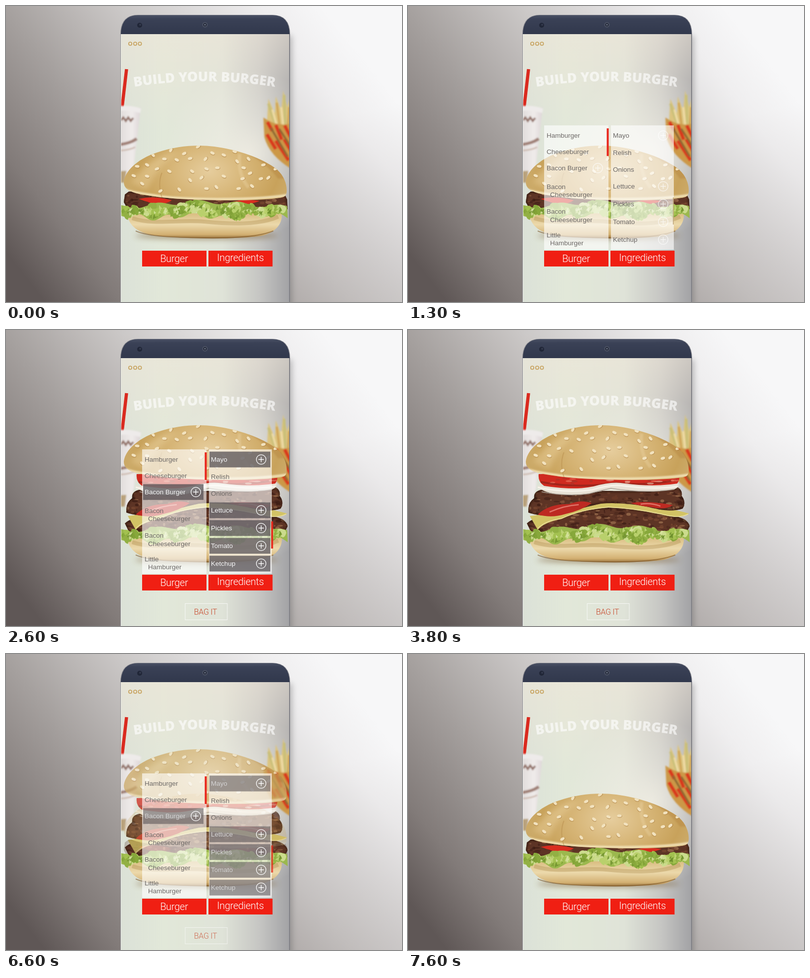
Write an HTML page that moves like this. It is 800 by 600 pixels and loops after 7.7 s.

```html
<!DOCTYPE html>
<html lang="en">
<head>
<meta charset="utf-8">
<title>Build your burger</title>
<style>
html, body { margin: 0; width: 100%; height: 100%; overflow: hidden; }
svg { display: block; width: 100vw; height: 100vh; }
.menu { font: 13.5px "Liberation Sans", Arial, sans-serif; }
.thin { font: 300 20px Roboto, "Liberation Sans", sans-serif; letter-spacing: -.3px; text-anchor: middle; }
#title { font: 800 30px "Open Sans", Roboto, sans-serif; font-stretch: 75%; text-anchor: middle; }
</style>
</head>
<body>
<svg viewBox="0 0 800 600">
<defs>
  <linearGradient id="wall" gradientUnits="userSpaceOnUse" x1="0" y1="500" x2="640" y2="0">
    <stop offset="0" stop-color="#5f5756"/><stop offset=".15" stop-color="#827b79"/>
    <stop offset=".37" stop-color="#a5a09e"/><stop offset=".6" stop-color="#cbc8c7"/>
    <stop offset=".72" stop-color="#dad8d8"/><stop offset=".88" stop-color="#efeeef"/><stop offset="1" stop-color="#f7f7f8"/>
  </linearGradient>
  <linearGradient id="corner" gradientUnits="userSpaceOnUse" x1="650" y1="230" x2="740" y2="600">
    <stop offset="0" stop-color="#8f8684" stop-opacity="0"/><stop offset="1" stop-color="#8f8684" stop-opacity=".18"/>
  </linearGradient>
  <linearGradient id="bar" x2="0" y2="1"><stop offset="0" stop-color="#4a5165"/><stop offset=".2" stop-color="#3a4156"/><stop offset="1" stop-color="#31384c"/></linearGradient>
  <linearGradient id="screen">
    <stop offset="0" stop-color="#dbe1d7"/><stop offset=".25" stop-color="#e2e8d9"/><stop offset=".6" stop-color="#dfe3d8"/>
    <stop offset=".82" stop-color="#c6c6c3"/><stop offset="1" stop-color="#a2a2a5"/>
  </linearGradient>
  <linearGradient id="warm" x2="0" y2="1"><stop offset="0" stop-color="#efe6d8" stop-opacity=".55"/><stop offset=".35" stop-color="#efe6d8" stop-opacity="0"/></linearGradient>
  <radialGradient id="glow" gradientUnits="userSpaceOnUse" cx="490" cy="300" r="170">
    <stop offset="0" stop-color="#f4f1e6" stop-opacity=".8"/><stop offset="1" stop-color="#f4f1e6" stop-opacity="0"/>
  </radialGradient>
  <linearGradient id="cup"><stop offset="0" stop-color="#dfdbda"/><stop offset=".6" stop-color="#efebea"/><stop offset="1" stop-color="#ddd6d7"/></linearGradient>
  <radialGradient id="bun" gradientUnits="userSpaceOnUse" cx="410" cy="335" r="165" gradientTransform="translate(0 100) scale(1 .7)">
    <stop offset="0" stop-color="#e6cd9d"/><stop offset=".45" stop-color="#d7b678"/><stop offset=".85" stop-color="#c8a25b"/><stop offset="1" stop-color="#cba967"/>
  </radialGradient>
  <linearGradient id="heel" x2="0" y2="1"><stop offset="0" stop-color="#d9bd81"/><stop offset=".45" stop-color="#ecd9ab"/><stop offset=".85" stop-color="#d3b072"/><stop offset="1" stop-color="#96703b"/></linearGradient>
  <filter id="soft" x="-30%" y="-30%" width="160%" height="160%"><feGaussianBlur stdDeviation="1.6"/></filter>
  <filter id="blur" x="-40%" y="-80%" width="180%" height="260%"><feGaussianBlur stdDeviation="6"/></filter>
  <clipPath id="glass"><rect x="232" y="57" width="341" height="543"/></clipPath>
  <path id="crown" d="M238 357C240 331 273 307 305 297C335 287 362 283 390 283C450 283 520 308 548 332C562 345 568 362 567 376C566 388 560 388 545 390C490 397 350 394 300 386C262 381 238 376 238 357Z"/>
  <clipPath id="crownClip"><use href="#crown"/></clipPath>
  <path id="arc" d="M252 165Q400 140 550 165"/>

  <g id="back">
    <path d="M232 57H573V600H232Z" fill="url(#screen)"/>
    <path d="M232 57H573V600H232Z" fill="url(#warm)"/>
    <path d="M232 57H573V600H232Z" fill="url(#glow)"/>
    <path d="M243.500 128L234.500 206" stroke="#da2a1f" stroke-width="6.500"/>
    <g filter="url(#soft)">
      <path d="M228 203L272 206L259 320L246 358H228Z" fill="url(#cup)"/>
      <path d="M228 203Q252 200 273 208L271 217Q250 210 228 213Z" fill="#eeebea"/>
      <path d="M232 232l5-6 5 7 5-7 5 7 5-6" fill="none" stroke="#94756c" stroke-width="4"/>
      <path d="M230 281Q252 278 264 269" fill="none" stroke="#a08177" stroke-width="6"/>
      <path d="M231 293Q250 292 261 286" fill="none" stroke="#cdb9ae" stroke-width="3"/>
      <path d="M230 335L243 334L240 358H230Z" fill="#b9a27c"/>
    </g>
    <g filter="url(#soft)">
      <path d="M527 240L530 188L543 218L545 183L556 212L560 171L568 205L576 180V275Z" fill="#dcc47f"/>
      <path d="M530 198L545 244M562 180L564 240" stroke="#c9bf78" stroke-width="5"/>
      <path d="M547 196L553 245M572 205L569 250" stroke="#d0a354" stroke-width="4"/>
      <path d="M538 210L548 246M556 205L561 250" stroke="#efdca6" stroke-width="4"/>
      <path d="M520 226Q548 246 576 238V330Q532 303 522 266Z" fill="#cc9847"/>
      <path d="M528 235l10 18M545 241l12 30M563 242l12 24M527 260l18 30M545 273l26 40M562 270l14 24" stroke="#d9371f" stroke-width="7"/>
      <path d="M535 247l34 58M552 249l22 34" stroke="#8b6730" stroke-width="4"/>
    </g>
  </g>

  <g id="base">
    <ellipse cx="405" cy="466" rx="145" ry="7" fill="#816640" opacity=".6" filter="url(#blur)"/>
    <path d="M244 420C250 452 272 465 330 468C400 473 480 471 515 466C547 459 559 440 557 420Z" fill="url(#heel)"/>
    <path d="M262 456C290 468 340 469 400 470C460 471 510 468 540 456" fill="none" stroke="#775024" stroke-width="2" opacity=".55"/>
    <path d="M255 430C300 445 350 432 400 437S510 445 550 427" fill="none" stroke="#aa8649" stroke-width="8" opacity=".35"/>
  </g>
  <g id="top">
    <use href="#crown" fill="url(#bun)"/>
    <g clip-path="url(#crownClip)">
      <path d="M252 357Q290 303 350 296Q304 325 284 375Z" fill="#ecd4a3" opacity=".45" filter="url(#blur)"/>
      <path d="M472 300Q467 340 490 368" fill="none" stroke="#eed7a8" stroke-width="7" opacity=".35" filter="url(#soft)"/>
      <path d="M460 287Q530 302 570 350L550 350Q520 310 460 287Z" fill="#b58642" opacity=".45" filter="url(#soft)"/>
      <path d="M234 370C255 378 275 380 300 384C350 393 500 395 570 383" fill="none" stroke="#f0dfb2" stroke-width="5" filter="url(#soft)"/>
      <path d="M315 338Q306 360 315 388" fill="none" stroke="#b88d4c" stroke-width="2" opacity=".5"/>
      <g id="seeds"/>
    </g>
  </g>
  <g id="lettuce"/>
</defs>

<rect width="800" height="600" fill="url(#wall)"/>
<rect x="573" width="227" height="600" fill="url(#corner)"/>
<path d="M300 60H578V640H300Z" fill="#555" opacity=".35" filter="url(#blur)"/>
<path d="M231 600V58Q231 18 266 18H538Q574 18 574 58V600Z" fill="#8c8c91"/>
<path d="M232 57Q233 18.500 267 18.500H538Q572 18.500 573 57Z" fill="url(#bar)"/>
<circle cx="270" cy="39" r="5" fill="#202637"/><circle cx="271" cy="38" r="2" fill="#333a4d"/>
<circle cx="402" cy="38" r="5.500" fill="#4b5163"/><circle cx="402" cy="38" r="3.500" fill="#272d3d"/><circle cx="402" cy="38" r="1.200" fill="#8b91a2"/>

<g clip-path="url(#glass)">
  <g id="small"/>
  <g id="tall"/>
  <path d="M232.500 57V600" stroke="#f4f5ef" opacity=".7"/>
  <path d="M572.500 57V600" stroke="#77777d"/>
  <g fill="none" stroke="#c6a05a" stroke-width="1.600">
    <circle cx="251" cy="76.500" r="3.200"/><circle cx="261" cy="76.500" r="3.200"/><circle cx="270.500" cy="76.500" r="3.200"/>
  </g>
  <text id="title" fill="#fff" opacity=".62"><textPath href="#arc" startOffset="50%">BUILD YOUR BURGER</textPath></text>
  <g id="menu" class="menu">
    <path d="M275 242H405V494H275ZM410 242H537V494H410Z" fill="#fff" opacity=".62"/>
    <path d="M535 388h2v55h-2z" fill="#b59a68" opacity=".7"/>
    <g id="plain" fill="#6c6866"/>
    <g id="picked"/>
    <path d="M401.500 248h4v56h-4z" fill="#e9261c"/>
  </g>
  <path d="M275 496H405V528H275ZM409 496H538.500V528H409Z" fill="#f01f13"/>
  <g class="thin" fill="#fff"><text x="339.500" y="518.500">Burger</text><text x="473.500" y="517">Ingredients</text></g>
  <g id="bag">
    <rect x="362" y="554.500" width="85" height="33" fill="none" stroke="#fff" opacity=".75"/>
    <text class="thin" x="403" y="577" fill="#c8482b" style="font-size:16px">BAG IT</text>
  </g>
</g>
</svg>
<script>
const $ = id => document.getElementById(id);
let seed = 7;
const rand = () => (seed = (seed * 16807) % 2147483647) / 2147483647;
const rnd = (a, b) => +(a + (b - a) * rand()).toFixed(1);
const pick = list => list[Math.floor(rand() * list.length)];
const repeat = (n, fn) => Array.from({ length: n }, (_, i) => fn(i)).join('');
const path = (d, fill, more = '') => `<path d="${d}" fill="${fill}" ${more}/>`;
const use = (id, more = '') => `<use href="#${id}" ${more}/>`;

// Sesame seeds as x, y pairs
const sesame = [333,292, 297,302, 360,299, 388,285, 345,312, 320,310, 305,330, 330,335, 285,322, 265,325,
  258,344, 285,345, 275,360, 312,375, 372,309, 417,298, 440,302, 403,310, 405,330, 427,328, 372,353, 376,335,
  395,348, 405,370, 425,367, 440,345, 462,295, 480,328, 490,310, 467,315, 520,322, 478,350, 497,365, 515,350,
  530,348, 545,330, 470,370, 493,339, 350,372];
$('seeds').innerHTML = repeat(sesame.length / 2, i => {
  const x = sesame[2 * i], y = sesame[2 * i + 1];
  const spin = `rotate(${rnd(-60, 60)} ${x} ${y})`;
  return `<g transform="${spin}"><ellipse cx="${x + .6}" cy="${y + 1}" rx="5.2" ry="3.2" fill="#a5793c" opacity=".5"/>` +
    `<ellipse cx="${x}" cy="${y}" rx="4.7" ry="2.8" fill="#f2e2be"/></g>`;
});

// Frilly lettuce: a wavy band covered with folded leaves and thin veins
const upper = x => 402 + 4 * Math.sin(x / 13) - 5 * Math.cos((x - 400) / 55);
const lower = x => 426 + 5 * Math.sin(x / 9) + 4 * Math.sin(x / 23 + 1);
const edge = [];
for (let x = 232; x <= 569; x += 3) edge.push(`${x} ${upper(x).toFixed(1)}`);
for (let x = 569; x >= 232; x -= 3) edge.push(`${x} ${lower(x).toFixed(1)}`);
const leaf = (d, fill, more, size) => {
  const x = rnd(242, 560), y = rnd(upper(x) + 4, lower(x) - 3);
  return path(d, fill, `${more} transform="translate(${x} ${y}) rotate(${rnd(-45, 45)}) scale(${rnd(size, size * 1.7)})"`);
};
$('lettuce').innerHTML = path('M' + edge.join('L') + 'Z', '#9bb84e') +
  repeat(80, () => leaf('M-9-7Q-3-12 3-8Q9-8 10-1Q7 9 2 8Q-1 4-4 10Q-9 6-8 0Z', pick(['#87a83b', '#a3c150', '#b9d06c', '#92b044', '#cbdb8d']), '', .6)) +
  repeat(110, () => leaf('M-6 6Q-5-3 1-8Q0 0 4 5Q-1 2-6 6Z', pick(['#6d8f2c', '#d9e5a4', '#c3d77c', '#80a036']), 'opacity=".8"', .5));

// Grilled meat: lumpy outline filled with random specks
function patty(id, d, y0, y1, n) {
  return `<clipPath id="${id}"><path d="${d}"/></clipPath><g clip-path="url(#${id})">` +
    path(d, '#5d3425') + repeat(n, () =>
      `<ellipse cx="${rnd(238, 570)}" cy="${rnd(y0, y1)}" rx="${rnd(1, 7)}" ry="${rnd(.8, 3.5)}" opacity=".65" fill="${
        pick(['#42211a', '#4c281c', '#7d4a32', '#381a12', '#8a5a3f', '#6e3d28', '#a87a55'])}"/>`) +
    path(d, 'none', 'stroke="#2b130d" stroke-width="7" opacity=".5" filter="url(#soft)"') + '</g>';
}

$('small').innerHTML = use('back') + use('base') +
  patty('meat0', 'M240 382L248 376H560L568 392L569 412H246L238 398Z', 376, 412, 150) +
  path('M268 391Q300 384 335 394Q318 405 295 400ZM455 398Q480 390 512 395Q490 406 455 398Z', '#d92d20') +
  use('lettuce') + use('top');

$('tall').innerHTML = use('back') + use('base') +
  patty('meat1', 'M240 392Q255 378 285 380Q330 366 400 359Q480 362 530 376Q566 380 569 398L562 412H250Z', 358, 412, 260) +
  use('lettuce') +
  path('M246 377Q290 372 350 355Q410 344 470 354Q530 361 568 372Q552 383 520 376Q460 362 405 360Q350 364 310 383Q275 390 262 405Z', '#d2c365') +
  path('M262 403Q275 387 310 382Q350 363 405 359Q460 361 520 375Q550 382 566 373', 'none', 'stroke="#ebe09a" stroke-width="1.5"') +
  patty('meat2', 'M243 362Q244 348 255 341Q253 328 268 324Q330 326 400 326Q480 328 545 319Q555 324 553 336Q563 350 555 362Q530 370 500 362Q440 348 390 352Q350 360 310 374Q270 380 243 370Z', 320, 378, 260) +
  path('M262 374Q285 352 325 353Q350 343 371 351Q350 366 318 373Q290 382 262 374ZM450 351Q480 345 535 355Q520 366 490 359Q465 356 450 351Z', '#bd2a22') +
  path('M286 369Q315 356 345 354M470 353Q490 350 510 357', 'none', 'stroke="#e07468" stroke-width="2.5"') +
  path('M264 292H549Q549 310 538 316Q480 322 420 313Q350 328 275 316Q262 308 264 292Z', '#cf2b20') +
  path('M268 308Q340 322 420 310Q480 317 544 304', 'none', 'stroke="#8e2319" stroke-width="4" opacity=".7"') +
  repeat(24, () => `<ellipse cx="${rnd(275, 540)}" cy="${rnd(299, 312)}" rx="${rnd(3, 9)}" ry="${rnd(1, 2.5)}" fill="${pick(['#e9705b', '#a7352a', '#e4a48e'])}" opacity=".7"/>`) +
  path('M261 315Q325 327 375 317Q412 306 438 311Q495 319 546 311Q549 318 538 323Q480 332 410 321Q365 336 315 334Q270 331 261 315Z', '#e9e2d6') +
  path('M262 319Q320 331 372 324Q410 312 436 316Q500 324 544 317', 'none', 'stroke="#f7f3ea" stroke-width="3"') +
  path('M270 328Q320 338 365 332Q390 325 410 321Q480 332 538 323', 'none', 'stroke="#a69d92" stroke-width="1.5"') +
  use('top', 'transform="translate(0 -90)"');

// Menu rows: x, baseline, label
const rows = [
  [280, 267, 'Hamburger'], [280, 300, 'Cheeseburger'], [280, 333, 'Bacon Burger'],
  [280, 371, 'Bacon'], [287, 387, 'Cheeseburger'], [280, 421, 'Bacon'], [287, 438, 'Cheeseburger'],
  [280, 469, 'Little'], [287, 485, 'Hamburger'],
  [414, 267, 'Mayo'], [414, 302, 'Relish'], [414, 336, 'Onions'], [414, 370, 'Lettuce'],
  [414, 406, 'Pickles'], [414, 442, 'Tomato'], [414, 478, 'Ketchup']];
const label = ([x, y, s]) => `<text x="${x}" y="${y}">${s}</text>`;
const chosen = rows.filter(r => /Bacon B|Mayo|Lettuce|Pickles|Tomato|Ketchup/.test(r[2]));
const plus = ([x, y]) => {
  const cx = x < 400 ? 383.5 : 515.5, cy = y - 4.5;
  return `<circle cx="${cx}" cy="${cy}" r="9.7"/><path d="M${cx - 5.5} ${cy}h11m-5.500-5.500v11"/>`;
};
const pluses = alpha => `<g fill="none" stroke="#fff" stroke-width="1.300" opacity="${alpha}">${chosen.map(plus).join('')}</g>`;
$('plain').innerHTML = rows.map(label).join('') + pluses(.7);
$('picked').innerHTML = chosen.map(([x, y]) =>
  `<rect x="${x < 400 ? 277 : 411}" y="${y - 20.5}" width="${x < 400 ? 122 : 123}" height="32" fill="#514c50" opacity=".72"/>`).join('') +
  `<g fill="#fff">${chosen.map(label).join('')}</g>` + pluses(1) + path('M536 388h3.500v55h-3.500z', '#e9261c');

const title = $('title');
title.style.fontSize = Math.min(35, 30 * 286 / title.getComputedTextLength()) + 'px';

// Each change is a cross-fade in n steps of 100 ms
const begin = performance.now();
function frame() {
  const t = (performance.now() - begin) % 7700;
  const fade = (start, n) => Math.max(0, Math.min(1, (Math.floor((t - start) / 100) + 1) / n));
  const menu = fade(1000, 4) - fade(3600, 3) + fade(5800, 4) - fade(7400, 3);
  const tall = fade(2300, 4) - fade(6600, 4);
  $('menu').style.opacity = menu;
  for (const id of ['tall', 'picked', 'bag']) $(id).style.opacity = tall;
  requestAnimationFrame(frame);
}
frame();
</script>
</body>
</html>
```
